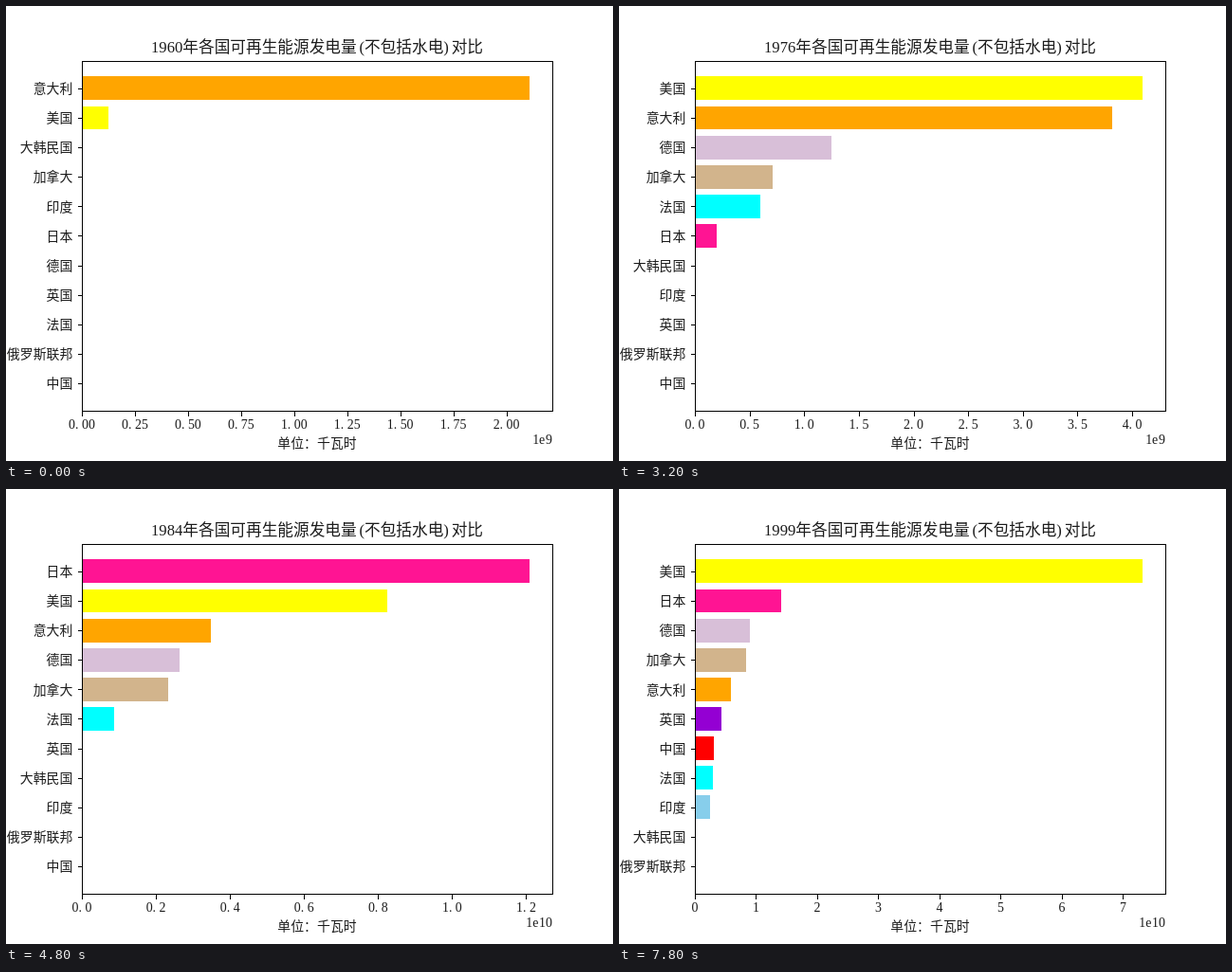
An HTML page for the animation above (8000 ms loop, 640x480 px).

```html
<!DOCTYPE html>
<html lang="zh-CN">
<head>
<meta charset="utf-8">
<title>各国可再生能源发电量</title>
<style>
  html, body { margin: 0; width: 100%; height: 100%; overflow: hidden; background: #fff; }
  svg { display: block; width: 640px; height: 480px; }
  text { font-family: "Liberation Serif", "Noto Sans CJK SC", "Noto Sans CJK", serif; font-weight: 300; fill: #1c1c1c; }
  rect { shape-rendering: crispEdges; }
</style>
</head>
<body>
<svg id="chart" viewBox="0 0 640 480"></svg>
<script>
const LEFT = 80, WIDTH = 496, BOTTOM = 427, TOP = 58;
const ROW = 369.6 / 11.88, FIRST_ROW = 86.85;
const SMALL = 13.89, LARGE = 16.67;
const STEP_MS = 200, YEARS = 40;

// Pairs of year (after 1900) and value in 1e9 kWh, joined by straight lines.
const countries = [
  ["意大利", "orange", [60, 2.111, 61, 2.4, 67, 3.473, 72, 3.817, 78, 3.817, 81, 3.47, 84, 3.48, 90, 3.25, 96, 4.2, 99, 5.9]],
  ["美国", "yellow", [60, .123, 67, .47, 71, .72, 72, 1.7, 76, 4.098, 78, 3.5, 81, 6.427, 82, 5.3, 84, 8.24, 87, 12.2, 88, 12.1, 90, 96, 91, 68, 99, 73.24]],
  ["大韩民国", "blue", [91, 0, 99, .1 * 5]],
  ["加拿大", "tan", [73, 0, 76, .711, 81, 1.905, 84, 2.33, 90, 3.86, 99, 8.37]],
  ["印度", "skyblue", [86, 0, 90, .03, 95, .7, 99, 2.48]],
  ["日本", "deeppink", [69, 0, 76, .2, 81, .898, 82, 10.6, 84, 12.1, 90, 11.38, 99, 14.1]],
  ["德国", "thistle", [69, 0, 70, .8, 76, 1.249, 81, 2.94, 84, 2.65, 90, 1.6, 95, 4, 99, 9]],
  ["英国", "darkviolet", [83, 0, 84, .005, 90, .6, 99, 4.34]],
  ["法国", "cyan", [65, 0, 67, .603, 76, .599, 81, .762, 84, .87, 90, 1.83, 99, 2.95]],
  ["俄罗斯联邦", "green", [89, 0, 90, .04]],
  ["中国", "red", [89, 0, 90, .06, 92, .1, 94, 2, 99, 3.1]]
].map(([name, color, keys]) => ({ name, color, keys }));
countries[2].keys[3] = .1;

function valueAt(keys, year) {
  if (year <= keys[0]) return keys[1];
  for (let i = 2; i < keys.length; i += 2) {
    if (year <= keys[i]) {
      const k = (year - keys[i - 2]) / (keys[i] - keys[i - 2]);
      return keys[i - 1] + (keys[i + 1] - keys[i - 1]) * k;
    }
  }
  return keys[keys.length - 1];
}

const rect = (x, y, w, h, fill = "#000") =>
  `<rect x="${x}" y="${y}" width="${w}" height="${h}" fill="${fill}"/>`;

// Latin characters take half a cell, Chinese ones a whole cell.
function label(str, x, y, size, align) {
  const chars = [...str];
  const advance = c => (c < "\x7f" ? size / 2 : size);
  let pos = x - align * chars.reduce((sum, c) => sum + advance(c), 0);
  const xs = chars.map(c => {
    const at = pos + (c === "(" ? size * .17 : 0);
    pos += advance(c);
    return at.toFixed(2);
  });
  return `<text font-size="${size}" x="${xs.join(" ")}" y="${y}">${str}</text>`;
}

function tickStep(max) {
  const raw = max / 9;
  const unit = 10 ** Math.floor(Math.log10(raw));
  return [1, 2, 2.5, 5, 10].map(s => s * unit).find(s => s >= raw);
}

function xAxis(max) {
  const step = tickStep(max);
  const count = Math.floor(max / step + 1e-9);
  const power = Math.floor(Math.log10(count * step) + 1e-9);
  const scaled = step / 10 ** power;
  const digits = [0, 1, 2].find(d => Math.abs(scaled - scaled.toFixed(d)) < 1e-6);
  let out = label(`1e${power + 9}`, 576, 462, SMALL, 1);
  for (let i = 0; i <= count; i++) {
    const x = LEFT + WIDTH * i * step / max;
    out += rect(Math.round(x), BOTTOM, 1, 6) + label((i * scaled).toFixed(digits), x, 446, SMALL, .5);
  }
  return out;
}

const frame =
  rect(LEFT, TOP, 1, BOTTOM - TOP + 1) + rect(LEFT + WIDTH, TOP, 1, BOTTOM - TOP + 1) +
  rect(LEFT, TOP, WIDTH + 1, 1) + rect(LEFT, BOTTOM, WIDTH + 1, 1) +
  label("单位：千瓦时", 328, 465.5, SMALL, .5);

function draw(year) {
  const rows = countries
    .map(c => ({ ...c, value: valueAt(c.keys, year) }))
    .sort((a, b) => b.value - a.value);
  const max = rows[0].value * 1.05;
  let bars = "", names = "";
  rows.forEach((r, i) => {
    const y = FIRST_ROW + i * ROW;
    const top = Math.round(y - ROW * .4), end = Math.round(y + ROW * .4);
    bars += rect(LEFT, top, Math.round(WIDTH * r.value / max), end - top, r.color);
    names += rect(76, Math.round(y), 5, 1) + label(r.name, 70.3, (y + 5.2).toFixed(1), SMALL, 1);
  });
  const title = label(`19${year}年各国可再生能源发电量(不包括水电)对比`, 328, 49, LARGE, .5);
  return bars + frame + names + xAxis(max) + title;
}

const chart = document.getElementById("chart");
const start = performance.now();
let shown = -1;

function tick() {
  const year = 60 + Math.floor((performance.now() - start) / STEP_MS) % YEARS;
  if (year !== shown) chart.innerHTML = draw(shown = year);
  requestAnimationFrame(tick);
}
tick();
</script>
</body>
</html>
```
